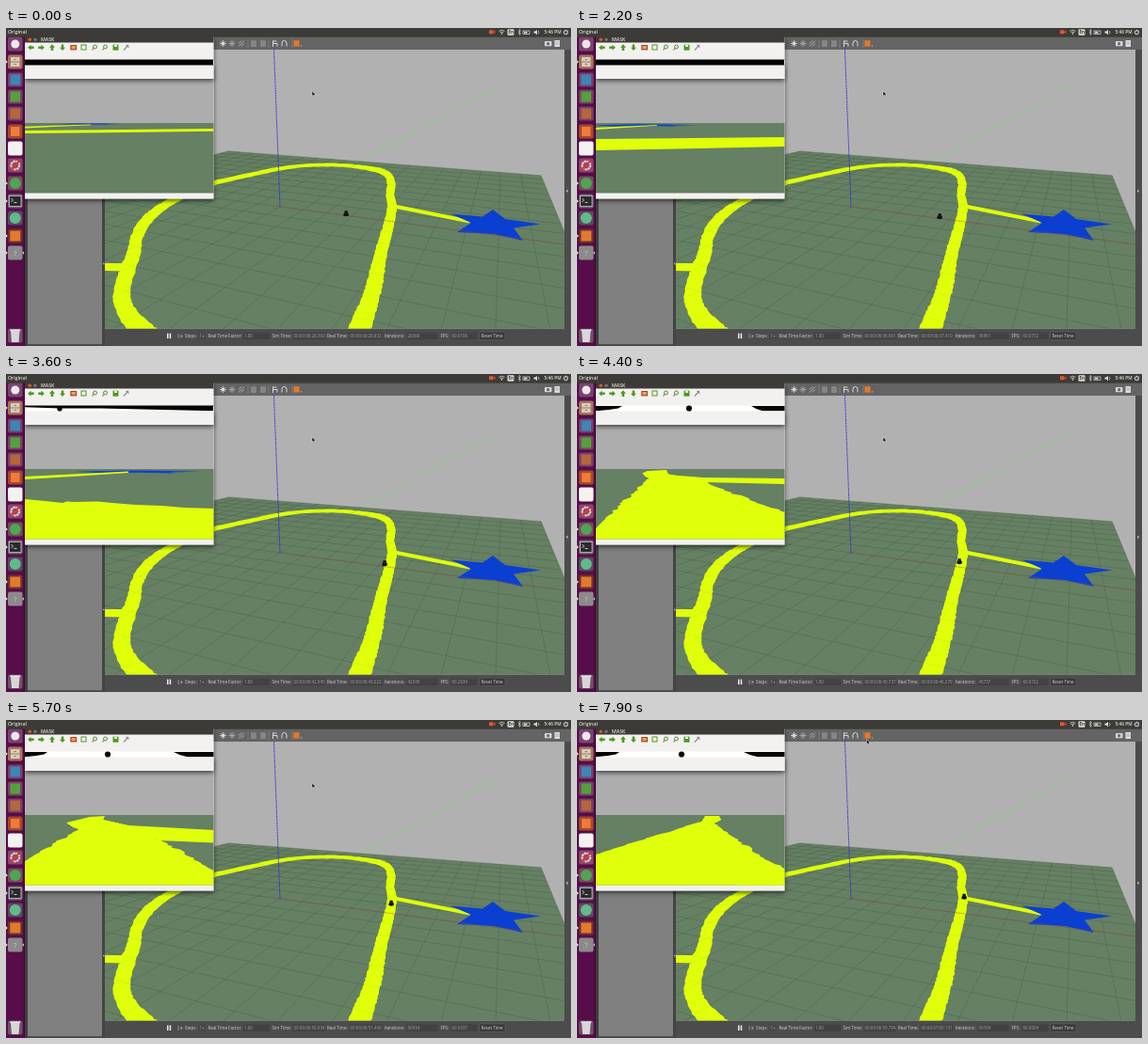
Animation, 600 px wide and 338 px high, one loop 8000 ms. Source, as an HTML page:

```html
<!DOCTYPE html>
<html lang="en">
<head>
<meta charset="utf-8">
<title>Line follower</title>
<style>
html, body { margin: 0; width: 100%; height: 100%; overflow: hidden; background: #4b4b4b; }
svg { display: block; width: 100vw; height: 100vh; }
text { font: 4.5px "Open Sans", "Noto Sans", sans-serif; fill: #d2d2d2; }
.title { font-size: 5.2px; font-weight: 600; fill: #e2dfd8; }
.value { fill: #a3a3a3; }
</style>
</head>
<body>
<svg id="stage" viewBox="0 0 600 338" preserveAspectRatio="none">
  <defs>
    <clipPath id="world"><rect x="105" y="23" width="488" height="296.500"/></clipPath>
    <clipPath id="cam"><rect x="20" y="54" width="200.500" height="121.500"/></clipPath>
    <clipPath id="strip"><rect x="20" y="33.500" width="200.500" height="6"/></clipPath>
    <filter id="shadow" x="-10%" y="-20%" width="120%" height="150%">
      <feDropShadow dx="0" dy="2" stdDeviation="2.500" flood-opacity=".65"/>
    </filter>
  </defs>
</svg>
<script>
const YELLOW = '#e0ff0a', GREEN = '#668064', SKY = '#b2b1b1', BLUE = '#0a3fd2', DARK = '#3c3b37';
const stage = document.getElementById('stage');

function add(parent, tag, attrs, text) {
  const el = document.createElementNS('http://www.w3.org/2000/svg', tag);
  for (const k in attrs) el.setAttribute(k, attrs[k]);
  if (text !== undefined) el.textContent = text;
  parent.appendChild(el);
  return el;
}
const rect = (p, x, y, width, height, fill, more) => add(p, 'rect', { x, y, width, height, fill, ...more });
const circle = (p, cx, cy, r, fill, more) => add(p, 'circle', { cx, cy, r, fill, ...more });
const path = (p, d, fill, more) => add(p, 'path', { d, fill, ...more });
const line = (p, d, stroke, width, more) => path(p, d, 'none', { stroke, 'stroke-width': width, ...more });
const label = (p, x, y, text, cls = '') => add(p, 'text', { x, y, class: cls }, text);
const poly = pts => 'M' + pts.map(q => q[0].toFixed(2) + ' ' + q[1].toFixed(2)).join('L') + 'Z';
const pairs = a => a.reduce((o, v, i) => (i % 2 ? o[o.length - 1].push(v) : o.push([v]), o), []);
const noise = i => { const s = Math.sin(i * 12.9898) * 43758.5453; return (s - Math.floor(s)) * 2 - 1; };

// Rows are [time, ...values]; values between rows are linear.
function at(rows, t) {
  let i = 0;
  while (i < rows.length - 2 && t >= rows[i + 1][0]) i++;
  const a = rows[i], b = rows[i + 1];
  const k = Math.min(1, Math.max(0, (t - a[0]) / (b[0] - a[0])));
  return a.slice(1).map((v, n) => v + (b[n + 1] - v) * k);
}

/* ---- simulator window ---- */
rect(stage, 0, 0, 600, 338, '#4c4c4c');
rect(stage, 20, 9.5, 580, 13.5, '#646464');
rect(stage, 19, 23, 4, 315, '#3f3f3f');
rect(stage, 23, 23, 79, 313, '#808080', { rx: 1 });
rect(stage, 102, 23, 3, 315, '#444');
const world = add(stage, 'g', { 'clip-path': 'url(#world)' });
rect(world, 105, 23, 488, 297, SKY);

// Ground coordinates (-10..10) to screen, from two vanishing points.
function ground(x, y) {
  const a = -0.0233 * x, b = 0.058 * y, w = 1 + a + b;
  return [(291 - 722 * a + 528 * b) / w, (190 + 56 * a + 59 * b) / w];
}
const seg = (x1, y1, x2, y2) => 'M' + ground(x1, y1) + 'L' + ground(x2, y2);
path(world, poly([ground(-10, 10), ground(10, 10), ground(10, -10), ground(-10, -10)]), GREEN);
let grid = '';
for (let i = -10; i <= 10; i++) grid += seg(i, 10, i, -10) + seg(-10, i, 10, i);
line(world, grid, '#3d5540', 0.45, { opacity: 0.55 });

function track(points) {
  const left = [], right = [];
  const spline = (a, b, c, d, u) => b + 0.5 * u * (c - a + u * (2 * a - 5 * b + 4 * c - d + u * (3 * (b - c) + d - a)));
  const mid = [];
  for (let i = 0; i < points.length - 1; i++) {
    const q = [-1, 0, 1, 2].map(k => points[Math.min(points.length - 1, Math.max(0, i + k))]);
    for (let s = 0; s < 10; s++) mid.push([0, 1, 2].map(n => spline(q[0][n], q[1][n], q[2][n], q[3][n], s / 10)));
  }
  for (let i = 1; i < mid.length - 1; i++) {
    const [x, y, w] = mid[i];
    const dx = mid[i + 1][0] - mid[i - 1][0], dy = mid[i + 1][1] - mid[i - 1][1], len = Math.hypot(dx, dy);
    const side = (s, seed) => {
      const r = s * w / 2 + noise(i + seed) * w * 0.045;
      return [x - dy / len * r, y + dx / len * r];
    };
    left.push(side(1, 0));
    right.unshift(side(-1, 500));
  }
  return poly(left.concat(right));
}
path(world, track([
  [152, 330, 27], [129, 304, 20], [123, 283, 18], [129, 258, 16], [136, 238, 14], [139, 222, 13],
  [148, 206, 12], [165, 191, 9], [190, 177, 7], [220, 165, 5], [255, 157, 4.5], [300, 148, 4],
  [345, 145.5, 3.6], [385, 149, 5], [404, 155, 7], [409, 165, 9], [408, 178, 9], [410, 190, 10],
  [407, 207, 11], [402, 225, 12.5], [397, 245, 14], [393, 265, 16.5], [388, 285, 18], [381, 305, 21], [371, 332, 26]
]), YELLOW);
path(world, 'M105 250L127 250L124 258.500L105 258Z', YELLOW);
path(world, 'M413 187.500L494 204L492 207.500L412 191.500Z', YELLOW);
path(world, 'M472 197.500L506 200.500L517 193L530 203L568 208.500L539 212.500L549 226L518 219L479 217L494 207Z', BLUE);
line(world, grid, '#3d5540', 0.45, { opacity: 0.12 });
line(world, seg(0, 0, 10, 0), '#a5463a', 0.6, { 'stroke-dasharray': '1.5 1' });
line(world, seg(0, 0, 0, 10), '#5f9a5c', 0.4, { opacity: 0.5 });
line(world, 'M378 141L527 60', '#72e070', 0.8, { 'stroke-dasharray': '4 1.6' });
line(world, 'M291 190L284.500 23', '#2b2bd8', 0.9, { 'stroke-dasharray': '1.7 .7' });
const robot = add(world, 'g', {});
path(robot, 'M-2.800 2.500L-2.200 0L-1.600 -.800L-1.400 -2.800L1.600 -2.800L2 -.500L2.900 .500L2.600 2.700L.500 3.200Z', '#0c0d0c');
rect(robot, -0.8, -0.6, 1.2, 0.9, '#4a4d45');

// toolbar
const icon = (d, x, color = '#cfcfcf') => line(stage, d, color, 0.9, { transform: `translate(${x} 16.500)` });
const rays = 'M0 -3.500V3.500M-3.500 0H3.500M-2.400 -2.400L2.400 2.400M-2.400 2.400L2.400 -2.400';
icon(rays, 230.5);
circle(stage, 230.5, 16.5, 1.8, '#dcdcdc');
icon(rays, 240, '#a8a8a8');
icon('M-3 0L0 -3M-3 3L3 -3M0 3L3 0', 250, '#bbb');
for (const x of [257, 279, 304]) line(stage, `M${x} 12V21`, '#8d8d8d', 0.6);
for (const x of [263, 273]) rect(stage, x - 2.3, 13.8, 4.6, 5.8, '#858585', { stroke: '#9b9b9b', 'stroke-width': 0.5 });
icon('M-2 -3V3.500M-2 -2.500H2M-2 0H2.500V3', 285.5, '#e2e2e2');
icon('M-2.500 3V-.500A2.500 2.500 0 0 1 2.500 -.500V3', 295.5, '#e2e2e2');
rect(stage, 305.5, 13.2, 6, 6.4, '#e8762a');
path(stage, 'M312.500 18.500h2l-1 1.300Z', '#ccc');
rect(stage, 572, 14, 7.5, 5.3, '#d8d8d8', { rx: 0.8 });
circle(stage, 575.7, 16.7, 1.6, '#666');
rect(stage, 582.5, 13, 5.5, 7, '#dedede');
line(stage, 'M583.500 15h3.500M583.500 17h3.500', '#777', 0.5);
path(stage, 'M596.500 171.500V175L594.800 173.200Z', '#d5d5d5');
path(stage, 'M104.300 249V252L102.800 250.500Z', '#bbb');

// status bar
rect(stage, 171, 324.5, 1.5, 5.5, '#eee');
rect(stage, 173.7, 324.5, 1.5, 5.5, '#eee');
line(stage, 'M183 325V330M184.500 327.500H187M185.500 325.500L187.500 327.500L185.500 329.500', '#aaa', 0.7);
rect(stage, 204.5, 323.5, 7.5, 7.5, '#474747');
path(stage, 'M208.500 327h2l-1 1.500Z', '#aaa');
function field(name, x, fx, fw, value) {
  label(stage, x, 328.8, name);
  rect(stage, fx, 323.5, fw, 7.5, '#424242', { rx: 0.6 });
  return label(stage, fx + 1, 328.8, value, 'value');
}
label(stage, 190, 328.8, 'Steps:');
label(stage, 205.5, 328.8, '1', 'value');
field('Real Time Factor:', 214.5, 252, 28, '1.00');
const simText = field('Sim Time:', 282.5, 304.5, 34.5, '');
const realText = field('Real Time:', 341, 364.5, 35, '');
const iterText = field('Iterations:', 402, 425.5, 33, '');
const fpsText = field('FPS:', 461.5, 472.5, 28, '');
rect(stage, 502.5, 323, 27.5, 8.5, '#3a3a3a', { rx: 1, stroke: '#686868', 'stroke-width': 0.5 });
label(stage, 504.5, 328.8, 'Reset Time');

/* ---- camera window ---- */
rect(stage, 20, 40, 200.5, 141.5, '#f2f1f0', { filter: 'url(#shadow)' });
const cam = add(stage, 'g', { 'clip-path': 'url(#cam)' });
rect(cam, 20, 50, 201, 51, '#aeadad');
rect(cam, 20, 101, 201, 75, GREEN);
const starEl = path(cam, '', BLUE);
const branchEl = path(cam, '', YELLOW);
const roadEl = path(cam, '', YELLOW);

/* ---- mask window ---- */
rect(stage, 20, 9, 200.5, 45, '#f2f1f0', { filter: 'url(#shadow)' });
rect(stage, 20, 9, 200.5, 6.5, DARK);
circle(stage, 25.3, 12.2, 1.8, '#e0552a');
circle(stage, 31, 12.2, 1.7, '#77756c');
label(stage, 37, 14.1, 'MASK', 'title');
const arrow = (x, turn) => path(stage, 'M-3.400 0L0 -3V-1.300H3.200V1.300H0V3Z', '#4a9a1e', { transform: `translate(${x} 20.700) rotate(${turn})` });
[[26.5, 0], [37.5, 180], [49, 90], [60, -90]].forEach(a => arrow(...a));
rect(stage, 68.3, 18, 6.8, 5.4, '#b33a22');
rect(stage, 69.5, 19, 4.4, 3.2, '#d8b04a');
rect(stage, 80, 18, 5, 5, 'none', { stroke: '#4a9a1e', 'stroke-width': 1 });
for (const x of [94.5, 105.5]) {
  circle(stage, x, 20, 2, '#e4efdc', { stroke: '#4f7f35', 'stroke-width': 0.9 });
  line(stage, `M${x - 1.4} 21.500L${x - 3} 23.500`, '#8a6a35', 1.1);
}
rect(stage, 113.5, 17.7, 6, 6, '#4a9a1e');
rect(stage, 115, 18, 3, 2, '#e8f2e0');
line(stage, 'M125 23.500L130 18M127.500 18L130.500 20.500', '#8f8f8b', 1.2);
const strip = add(stage, 'g', { 'clip-path': 'url(#strip)' });
rect(strip, 20, 33, 201, 7, '#fff');
const darkEl = path(strip, '', '#050505');
const dotEl = circle(stage, 0, 36.5, 3, '#050505');

/* ---- launcher ---- */
rect(stage, 0, 9, 20, 329, '#560d49');
rect(stage, 19.3, 9, 0.7, 329, '#35062d');
const tile = (y, fill) => rect(stage, 2, y - 7.5, 15.5, 15, fill, { rx: 2 });
tile(17, '#7a4470');
circle(stage, 9.8, 17, 4.5, '#efe6ec');
tile(36, '#a8735a');
rect(stage, 5, 31, 9.5, 10, '#d9cdbd');
line(stage, 'M5 36H14.500M8.500 33.500H11M8.500 38.500H11', '#7c6a58', 0.8);
[[55, '#3d85b5'], [73, '#55a03c'], [91, '#b4673a']].forEach(([y, c]) => {
  tile(y, '#774268');
  rect(stage, 4.5, y - 5.5, 10.5, 11, c);
});
tile(110, '#a34b2a');
rect(stage, 5, 105, 9.5, 10, '#ef7a3a');
tile(128, '#f4f2f0');
tile(146, '#8f4668');
circle(stage, 9.8, 146, 4.3, 'none', { stroke: '#e4e0de', 'stroke-width': 2.2, 'stroke-dasharray': '2.2 .7' });
line(stage, 'M6 150L13.500 142', '#d63a30', 2.4);
tile(165, '#774a5c');
circle(stage, 9.8, 165, 6, '#4fa553');
tile(184, '#6d6870');
rect(stage, 3.5, 178.5, 12.5, 11, '#2a2a2c', { stroke: '#c7c3c6', 'stroke-width': 0.8 });
line(stage, 'M5.500 181L7.500 183L5.500 185M8.500 185.500H11.500', '#eee', 0.8);
tile(202, '#5b4a60');
circle(stage, 9.8, 202, 6, '#62b989');
tile(221, '#6b3326');
rect(stage, 4.3, 215.5, 11, 11, '#e27a2e');
tile(239, '#8c8a8b');
label(stage, 8, 242, '?').setAttribute('style', 'font-size:8px;fill:#c8c6c7');
for (const y of [36, 165, 184, 221, 239]) path(stage, `M0 ${y - 1.7}L1.800 ${y}L0 ${y + 1.7}Z`, '#e5dfe3');
path(stage, 'M18.800 237.300V240.700L17.200 239Z', '#e5dfe3');
tile(327, '#71506b');
path(stage, 'M5 322H14.500L13.500 334H6Z', '#d9d6d8');
rect(stage, 4.3, 320.3, 11, 1.6, '#f0eeef');

/* ---- top panel ---- */
rect(stage, 0, 0, 600, 9.6, DARK);
label(stage, 2, 6.3, 'Original', 'title');
rect(stage, 513, 2.3, 4.5, 4, '#e4572e', { rx: 0.7 });
path(stage, 'M517.500 4.300L519.500 2.600V6Z', '#e4572e');
line(stage, 'M523.500 3.300Q526.500 1.200 529.500 3.300M524.700 4.800Q526.500 3.500 528.300 4.800', '#ddd', 0.8);
circle(stage, 526.5, 6.1, 0.8, '#ddd');
rect(stage, 532.5, 1.3, 7, 6.4, '#dfdbd2', { rx: 1 });
label(stage, 533.4, 6, 'En').setAttribute('style', 'font-weight:700;fill:#3c3b37');
line(stage, 'M544 2.500L546.500 6L545.300 7.500V1.300L546.500 2.800L544 6', '#ddd', 0.6);
rect(stage, 549, 3, 7, 3.4, 'none', { stroke: '#ddd', 'stroke-width': 0.7 });
rect(stage, 550, 3.8, 3.5, 1.8, '#ddd');
path(stage, 'M560.500 3.600H562L564 2V7.200L562 5.600H560.500Z', '#ddd');
line(stage, 'M565.300 3Q566.700 4.600 565.300 6.200', '#ddd', 0.7);
label(stage, 571.5, 6.3, '5:46 PM', 'title').setAttribute('style', 'font-size:4.8px');
circle(stage, 594.5, 4.6, 2, 'none', { stroke: '#ddd', 'stroke-width': 1.5, 'stroke-dasharray': '1.2 .4' });

const pointer = path(stage, 'M0 0V5.300L1.300 4.200L2.200 6L3.100 5.600L2.300 3.900H3.900Z', '#111', { stroke: '#eee', 'stroke-width': 0.5 });

/* ---- motion ---- */
const ROBOT = [[0, 361, 197], [2200, 385, 200], [3600, 402, 201], [4400, 406, 199], [5700, 409, 194.5], [6700, 410, 190.5], [7900, 411, 187.5]];
// Road edge heights below the horizon: top left, top right, bottom left, bottom right.
const BAND = [[0, 8, 6, 11, 8.7], [2200, 17, 15, 29, 25], [3600, 32, 42, 90, 90]]
  .map(r => r.map((v, i) => i ? 1 / v : v));
// Left height, nine outline points, right height.
const ROAD = [
  [3600, 133, 40, 135, 58, 137, 63, 135.5, 75, 136, 95, 135.5, 110, 137, 140, 139, 165, 140, 190, 142, 143],
  [4400, 164, 45, 139, 76, 111, 69, 105.5, 75, 103, 95, 102, 97, 106.5, 134, 113.5, 145, 119, 185, 134, 147],
  [5700, 150, 48, 133, 76, 116, 64, 109, 89, 103, 105, 102, 103, 106, 130, 112, 164, 128, 205, 150, 160],
  [6700, 122, 35, 113, 62, 107, 64, 104, 67, 102, 82, 102, 84, 107, 100, 114, 118, 123, 170, 150, 165],
  [7900, 143, 70, 127, 112, 114, 132, 108, 136, 102, 151, 102, 153, 106, 146, 110, 165, 124, 196, 145, 158]
];
const BRANCH = [
  [0, 20, 106.5, 20, 104.8, 90, 102.6, 90, 103.2, 50, 105],
  [2200, 20, 108, 20, 106, 85, 103, 85, 103.8, 50, 106],
  [3600, 20, 112, 20, 109, 130, 103.6, 130, 105, 70, 109],
  [4400, 95, 107, 134, 110, 220.5, 111, 220.5, 117, 134, 115],
  [5700, 102, 106, 130, 112, 220.5, 117, 220.5, 130.5, 162, 128],
  [6700, 84, 107, 118, 122, 220.5, 125.5, 220.5, 178, 118, 178],
  [7900, 150, 110, 170, 165, 220.5, 172, 220.5, 178, 170, 178]
];
// Left end, right end, height, thickness.
const STAR = [[0, 52, 125, 102, 1.2], [2200, 14, 130, 103.3, 2.2], [3600, 73, 207, 103.8, 2.8], [4100, 225, 370, 104, 3]];
// Lower rim of the dark area at three places, then the widths of the side wedges.
const MASK = [
  [2900, 40, 40, 40, 0, 0], [3600, 35.2, 36.4, 39.3, 0, 0], [3900, 33, 33, 33, 8, 8], [4400, 33, 33, 33, 28, 35],
  [5700, 33, 33, 33, 24, 42], [6600, 33, 33, 33, 0, 0], [6800, 33, 33, 33, 0, 0], [7900, 33, 33, 33, 25, 43]
];
const DOT = [[3600, 57, 37], [4400, 119, 36.5], [5700, 108, 36.5], [6700, 120, 36.5], [7900, 111, 36.5]];
const SIM = [[0, 388.36, 388.832], [2200, 396.961, 397.41], [3600, 402.545, 403.022], [4400, 405.737, 406.279],
  [5700, 410.934, 411.44], [6700, 414.903, 415.39], [7900, 419.704, 420.131]];
const FPS = [[0, 60.0199], [2200, 60.0772], [3600, 60.2634], [4400, 60.0722], [5700, 60.9337], [6700, 60.0104], [7900, 60.0004]];
const POINTER = [[7200, 325, 67], [7800, 307.5, 20.5]];

// Ragged outline: rows shift sideways, more when they are near.
function ragged(pts) {
  const out = [];
  for (let i = 0; i < pts.length - 1; i++) {
    const [a, b] = [pts[i], pts[i + 1]];
    const n = Math.max(1, Math.round(Math.abs(b[1] - a[1]) / 1.6));
    for (let s = 0; s < n; s++) {
      const x = a[0] + (b[0] - a[0]) * s / n, y = a[1] + (b[1] - a[1]) * s / n;
      const amp = Math.min(3.2, Math.max(0, y - 103) * 0.14);
      out.push([x + noise(i * 31 + s) * amp * (i ? 1 : s / n), y]);
    }
  }
  return out.concat([pts[pts.length - 1]]);
}

function roadShape(t) {
  if (t < 3600) {
    const [a, b, c, d] = at(BAND, t).map(v => 101 + 1 / v);
    return [[20, a], [100, (a + b) / 2 + 0.3], [220.5, b], [220.5, d], [105, (c + d) / 2 + 0.4], [20, c]];
  }
  const v = at(ROAD, t);
  const rim = [[20, v[0]], ...pairs(v.slice(1, -1)), [220.5, v[v.length - 1]]];
  return [...ragged(rim), [220.5, 178], [20, 178]];
}

function clock(s) {
  const two = n => String(Math.floor(n)).padStart(2, '0');
  return `00:00:${two(s / 60)}:${(s % 60).toFixed(3).padStart(6, '0')}`;
}

function draw(t) {
  robot.setAttribute('transform', `translate(${at(ROBOT, t)})`);
  roadEl.setAttribute('d', poly(roadShape(t)));
  branchEl.setAttribute('d', poly(pairs(at(BRANCH, t))));
  const [l, r, y, h] = at(STAR, t), w = r - l;
  starEl.setAttribute('d', poly([[l, y], [l + w * 0.35, y - h / 3], [l + w * 0.5, y - h / 2], [l + w * 0.65, y - h / 3],
    [r, y], [l + w * 0.75, y + h * 0.25], [l + w * 0.8, y + h * 0.6], [l + w * 0.5, y + h * 0.35], [l + w * 0.2, y + h * 0.5]]));

  const [a, b, c, lw, rw] = at(MASK, t);
  darkEl.setAttribute('d', poly([[20, 33], [221, 33], [221, c], [100, b], [58, b], [20, a]]) +
    poly([[20, 34], [20 + lw, 34], [20 + lw * 0.85, 36.5], [20 + lw * 0.5, 38], [20, 39.3]]) +
    poly([[221, 34], [220 - rw, 34], [220 - rw * 0.85, 37], [220 - rw * 0.65, 39.3], [221, 39.3]]));
  const [dx, dy] = at(DOT, t);
  dotEl.setAttribute('cx', dx);
  dotEl.setAttribute('cy', dy);
  dotEl.setAttribute('r', t < 3400 ? 0 : t < 3800 ? 2.6 : 3.1);

  const [sim, real] = at(SIM, t);
  simText.textContent = clock(sim);
  realText.textContent = clock(real);
  iterText.textContent = Math.round((sim - 360) * 1000);
  fpsText.textContent = at(FPS, t)[0].toFixed(4);
  pointer.setAttribute('transform', `translate(${at(POINTER, t)})`);
}

const start = performance.now();
function tick(now) {
  const t = Math.max(0, now - start) % 8000;
  draw(Math.floor(t / 100) * 100);
  requestAnimationFrame(tick);
}
draw(0);
requestAnimationFrame(tick);
</script>
</body>
</html>
```
